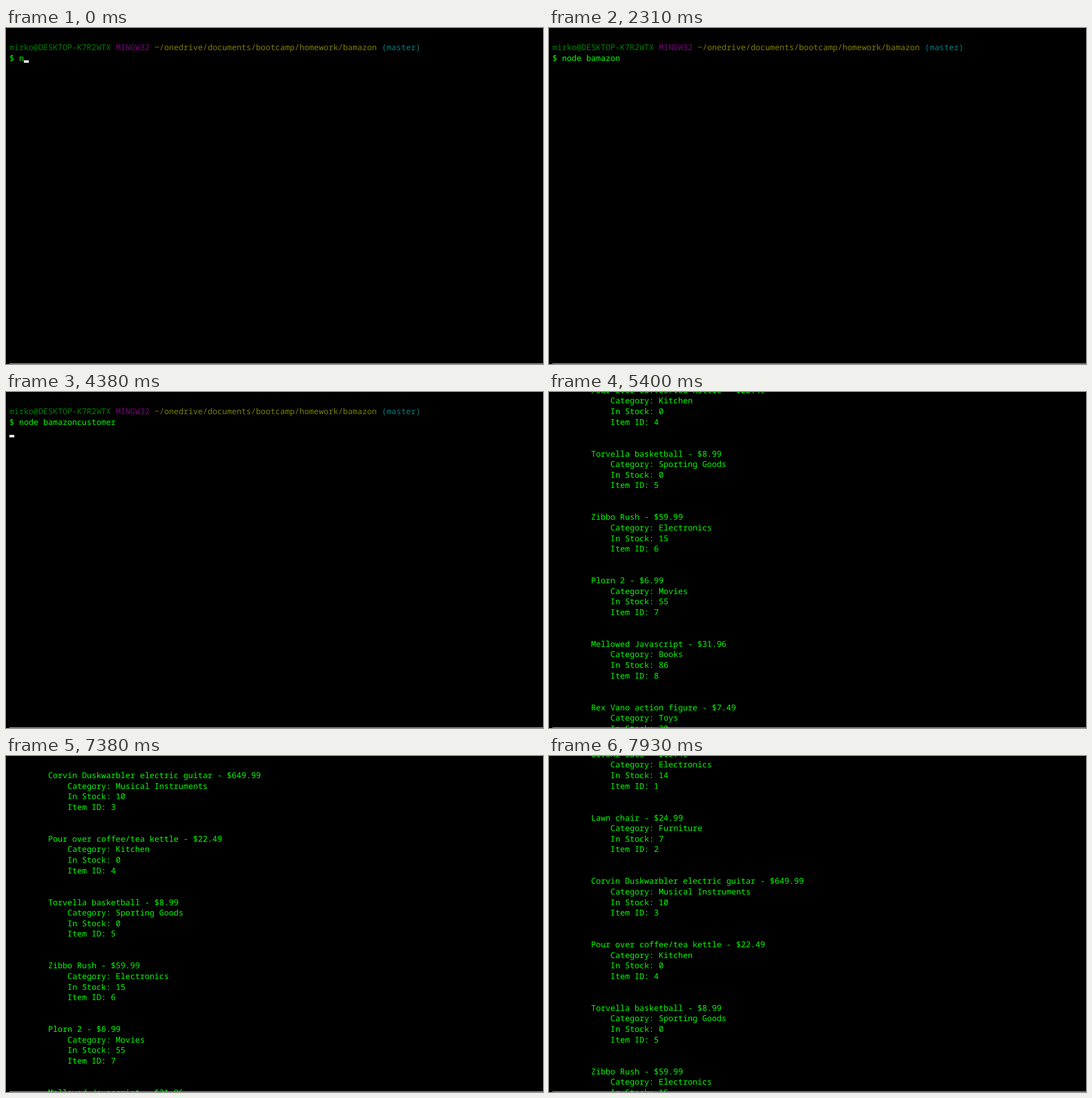
Write an HTML page that moves like this. It is 947x592 px and loops after 8 s.

```html
<!DOCTYPE html>
<html lang="en">
<head>
<meta charset="utf-8">
<title>Store terminal</title>
<style>
  html, body { margin: 0; width: 100%; height: 100%; overflow: hidden; background: #000; }
  svg { display: block; }
  text {
    font: 14.217px "Noto Sans Mono", "DejaVu Sans Mono", monospace;
    fill: #0f0;
    white-space: pre;
    text-rendering: geometricPrecision;
  }
  .cmd { font-weight: 500; }
</style>
</head>
<body>
<svg id="stage" width="947" height="592" viewBox="0 0 947 592">
  <rect width="947" height="592"/>
  <g id="shell"></g>
  <g id="list"></g>
  <rect x="6" y="591" width="941" height="1" fill="#c9b4be"/>
</svg>
<script>
const LOOP = 8000, LIST_AT = 5400;
const LEFT = 6, COL = 8.53, ROW = 18.625, BASE = 1.8;
const NS = 'http://www.w3.org/2000/svg';
const shell = document.getElementById('shell');
const list = document.getElementById('list');

function add(parent, tag, attrs, content = '') {
  const el = document.createElementNS(NS, tag);
  for (const key in attrs) el.setAttribute(key, attrs[key]);
  el.textContent = content;
  parent.appendChild(el);
  return el;
}

function print(parent, col, row, content, attrs = {}) {
  return add(parent, 'text', { x: LEFT + col * COL, y: BASE + row * ROW, ...attrs }, content);
}

// Prompt
let col = 0;
for (const [word, color] of [
  ['mirko@DESKTOP-K7R2WTX', '#008000'],
  ['MINGW32', '#800080'],
  ['~/onedrive/documents/bootcamp/homework/bamazon', '#808000'],
  ['(master)', '#008080']
]) {
  print(shell, col, 2, word, { style: `fill:${color}` });
  col += word.length + 1;
}
print(shell, 0, 3, '$', { class: 'cmd' });
const typed = print(shell, 2, 3, '', { class: 'cmd' });
const cursor = add(shell, 'rect', { width: COL, height: 4.3, fill: '#fff' });

// Products: name and price, category, stock
[
  ['Ulvone case - $15.49', 'Electronics', 14],
  ['Lawn chair - $24.99', 'Furniture', 7],
  ['Corvin Duskwarbler electric guitar - $649.99', 'Musical Instruments', 10],
  ['Pour over coffee/tea kettle - $22.49', 'Kitchen', 0],
  ['Torvella basketball - $8.99', 'Sporting Goods', 0],
  ['Zibbo Rush - $59.99', 'Electronics', 15],
  ['Plorn 2 - $6.99', 'Movies', 55],
  ['Mellowed Javascript - $31.96', 'Books', 86],
  ['Rex Vano action figure - $7.49', 'Toys', 30]
].forEach(([title, category, stock], i) => {
  const row = i * 6;
  print(list, 8, row, title);
  print(list, 12, row + 1, `Category: ${category}`);
  print(list, 12, row + 2, `In Stock: ${stock}`);
  print(list, 12, row + 3, `Item ID: ${i + 1}`);
});

// Time, letters typed, cursor shown
const command = 'node bamazoncustomer';
const typing = [
  [0, 1, 1], [120, 2, 1], [240, 3, 0], [520, 4, 1], [670, 5, 1], [820, 6, 1],
  [1090, 7, 1], [1240, 8, 1], [1400, 8, 0], [1670, 8, 1], [1830, 9, 1],
  [1990, 10, 1], [2150, 11, 1], [2310, 12, 0], [2590, 12, 1], [2750, 13, 1],
  [2920, 14, 1], [3080, 15, 1], [3240, 16, 1], [3410, 16, 0], [3560, 17, 1],
  [3710, 18, 1], [3860, 19, 1], [3980, 20, 1], [4380, 20, 1], [4970, 20, 0]
];
const ENTER_AT = 4380;

// Time, rows the list is moved down
const scrolling = [
  [LIST_AT, -18], [7110, -16], [7240, -13], [7380, -10],
  [7520, -8], [7660, -5], [7810, -3], [7930, 0]
];

function stepAt(steps, t) {
  let current = steps[0];
  for (const step of steps) if (step[0] <= t) current = step;
  return current;
}

function draw(t) {
  const listing = t >= LIST_AT;
  shell.setAttribute('display', listing ? 'none' : 'inline');
  list.setAttribute('display', listing ? 'inline' : 'none');
  if (listing) {
    list.setAttribute('transform', `translate(0 ${stepAt(scrolling, t)[1] * ROW})`);
    return;
  }
  const [, count, shown] = stepAt(typing, t);
  const entered = t >= ENTER_AT;
  typed.textContent = command.slice(0, count);
  cursor.setAttribute('x', LEFT + (entered ? 0 : count + 2) * COL);
  cursor.setAttribute('y', BASE + (entered ? 4 : 3) * ROW - 0.7);
  cursor.setAttribute('opacity', shown);
}

const start = performance.now();
function tick() {
  draw((performance.now() - start) % LOOP);
  requestAnimationFrame(tick);
}
tick();
</script>
</body>
</html>
```
